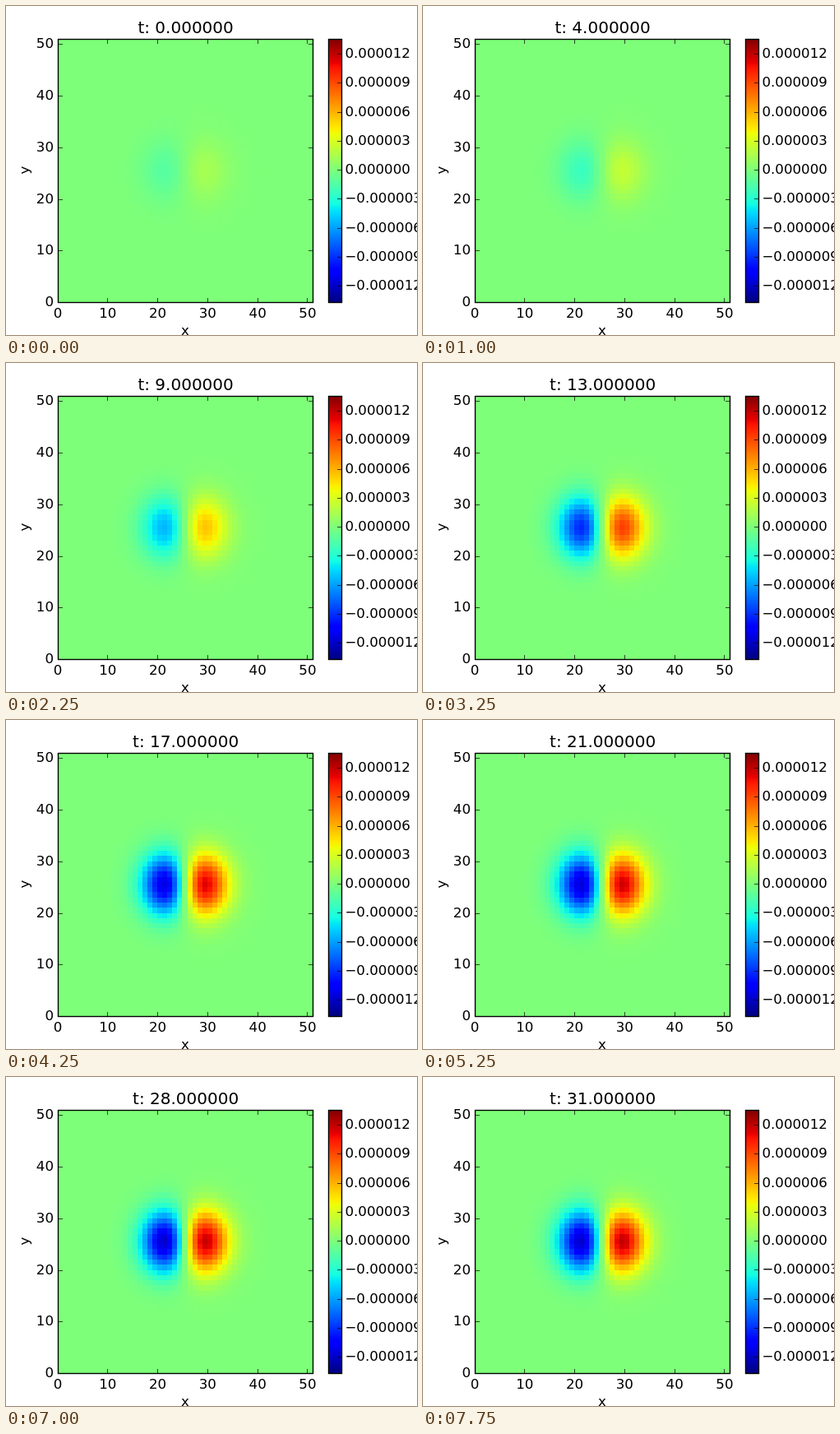
An HTML page with a canvas for the animation above (8 s loop, 500x400 px).

```html
<!DOCTYPE html>
<html>
<head>
<meta charset="utf-8">
<style>
html, body { margin: 0; width: 100%; height: 100%; overflow: hidden; background: #fff; }
canvas { display: block; }
</style>
</head>
<body>
<canvas id="stage" width="500" height="400"></canvas>
<script>
const ctx = document.getElementById('stage').getContext('2d');
const STEP = 250, STEPS = 32, CELLS = 51;
const plot = { x: 62.5, y: 40, w: 310, h: 320 };
const bar = { x: 392, y: 40, w: 16, h: 320 };
const LOW = -13.7, HIGH = 13.53; // colour range, in millionths
const SPREAD = 4.15; // lobe width, in cells
const TICK = 5.5;
const FONT = '"DejaVu Sans", sans-serif';

// Peak strength over time: [t, value]
const growth = [[0, 1.3], [4, 2.3], [9, 5.4], [13, 9.3], [17, 11.3], [25, 11.8], [31, 12]];

// Piecewise linear lookup
function ramp(points, x) {
  let i = 1;
  while (i < points.length - 1 && x > points[i][0]) i++;
  const [x0, y0] = points[i - 1], [x1, y1] = points[i];
  return y0 + (y1 - y0) * (x - x0) / (x1 - x0);
}

// Cubic Hermite lookup through the growth points
function strength(t) {
  let i = 0;
  while (i < growth.length - 2 && t > growth[i + 1][0]) i++;
  const slope = k => {
    const a = growth[Math.max(k - 1, 0)], b = growth[Math.min(k + 1, growth.length - 1)];
    return (b[1] - a[1]) / (b[0] - a[0]);
  };
  const [t0, v0] = growth[i], [t1, v1] = growth[i + 1];
  const h = t1 - t0, u = (t - t0) / h, w = 1 - u;
  return v0 * w * w * (1 + 2 * u) + v1 * u * u * (3 - 2 * u)
    + h * u * w * (slope(i) * w - slope(i + 1) * u);
}

const RED = [[0, 0], [.35, 0], [.66, 1], [.89, 1], [1, .5]];
const GREEN = [[0, 0], [.125, 0], [.375, 1], [.64, 1], [.91, 0], [1, 0]];
const BLUE = [[0, .5], [.11, 1], [.34, 1], [.65, 0], [1, 0]];

function jet(f) {
  f = Math.min(1, Math.max(0, f));
  return `rgb(${[RED, GREEN, BLUE].map(c => Math.round(255 * ramp(c, f)))})`;
}

// Horizontal derivative of a round Gaussian, scaled to peak at 1
function field(col, row) {
  const dx = (col - 25) / SPREAD, dy = (row - 25) / SPREAD;
  return dx * Math.exp((1 - dx * dx - dy * dy) / 2);
}

const shape = Array.from({ length: CELLS * CELLS },
  (_, i) => field(i % CELLS, Math.floor(i / CELLS)));

const px = v => plot.x + v * plot.w / CELLS;
const py = v => plot.y + plot.h - v * plot.h / CELLS;
const barY = v => 199 - v * 11.75;
const snap = v => Math.round(v) + 0.5;
const baseline = y => Math.round(y + 5.2);

function text(str, x, y, align, size = 16.667) {
  ctx.font = `${size}px ${FONT}`;
  ctx.textAlign = align;
  ctx.fillStyle = '#000';
  ctx.fillText(str, x, y);
}

function line(x0, y0, x1, y1) {
  ctx.beginPath();
  ctx.moveTo(x0, y0);
  ctx.lineTo(x1, y1);
  ctx.stroke();
}

function frame({ x, y, w, h }) {
  ctx.strokeStyle = '#000';
  ctx.lineWidth = 1.39;
  ctx.strokeRect(snap(x), snap(y), w, h);
  ctx.lineWidth = 0.7;
}

function drawField(t) {
  const peak = strength(t);
  for (let row = 0; row < CELLS; row++) {
    const top = Math.round(py(row + 1)), bottom = Math.round(py(row));
    for (let col = 0; col < CELLS; col++) {
      const left = Math.round(px(col)), right = Math.round(px(col + 1));
      ctx.fillStyle = jet((shape[row * CELLS + col] * peak - LOW) / (HIGH - LOW));
      ctx.fillRect(left, top, right - left, bottom - top);
    }
  }
}

function drawAxes() {
  const left = snap(plot.x), right = left + plot.w;
  const top = snap(plot.y), bottom = top + plot.h;
  frame(plot);
  for (let v = 0; v <= 50; v += 10) {
    const x = snap(px(v)), y = snap(py(v));
    line(x, bottom, x, bottom - TICK);
    line(x, top, x, top + TICK);
    line(left, y, left + TICK, y);
    line(right, y, right - TICK, y);
    text(v, px(v) + 0.5, 379, 'center');
    text(v, 58, baseline(py(v)), 'right');
  }
  text('x', 218, 400, 'center');
  ctx.save();
  ctx.translate(28, 199.5);
  ctx.rotate(-Math.PI / 2);
  text('y', 0, 0, 'center');
  ctx.restore();
}

function drawBar() {
  for (let y = 0; y < bar.h; y++) {
    ctx.fillStyle = jet(1 - (y + 0.5) / bar.h);
    ctx.fillRect(bar.x, bar.y + y, bar.w, 1);
  }
  frame(bar);
  const right = snap(bar.x + bar.w);
  for (let v = -12; v <= 12; v += 3) {
    const y = snap(barY(v));
    line(right - TICK, y, right, y);
    const label = (v < 0 ? '\u2212' : '') + (Math.abs(v) / 1e6).toFixed(6);
    text(label, 412.4, baseline(barY(v)), 'left');
  }
}

function draw(now) {
  const t = Math.floor(now / STEP) % STEPS;
  ctx.fillStyle = '#fff';
  ctx.fillRect(0, 0, 500, 400);
  drawField(t);
  drawAxes();
  drawBar();
  text(`t: ${t.toFixed(6)}`, 218.6, 33, 'center', 20);
}

let start;
function tick(now) {
  start ??= now;
  draw(Math.max(0, now - start));
  requestAnimationFrame(tick);
}
draw(0);
requestAnimationFrame(tick);
</script>
</body>
</html>
```
